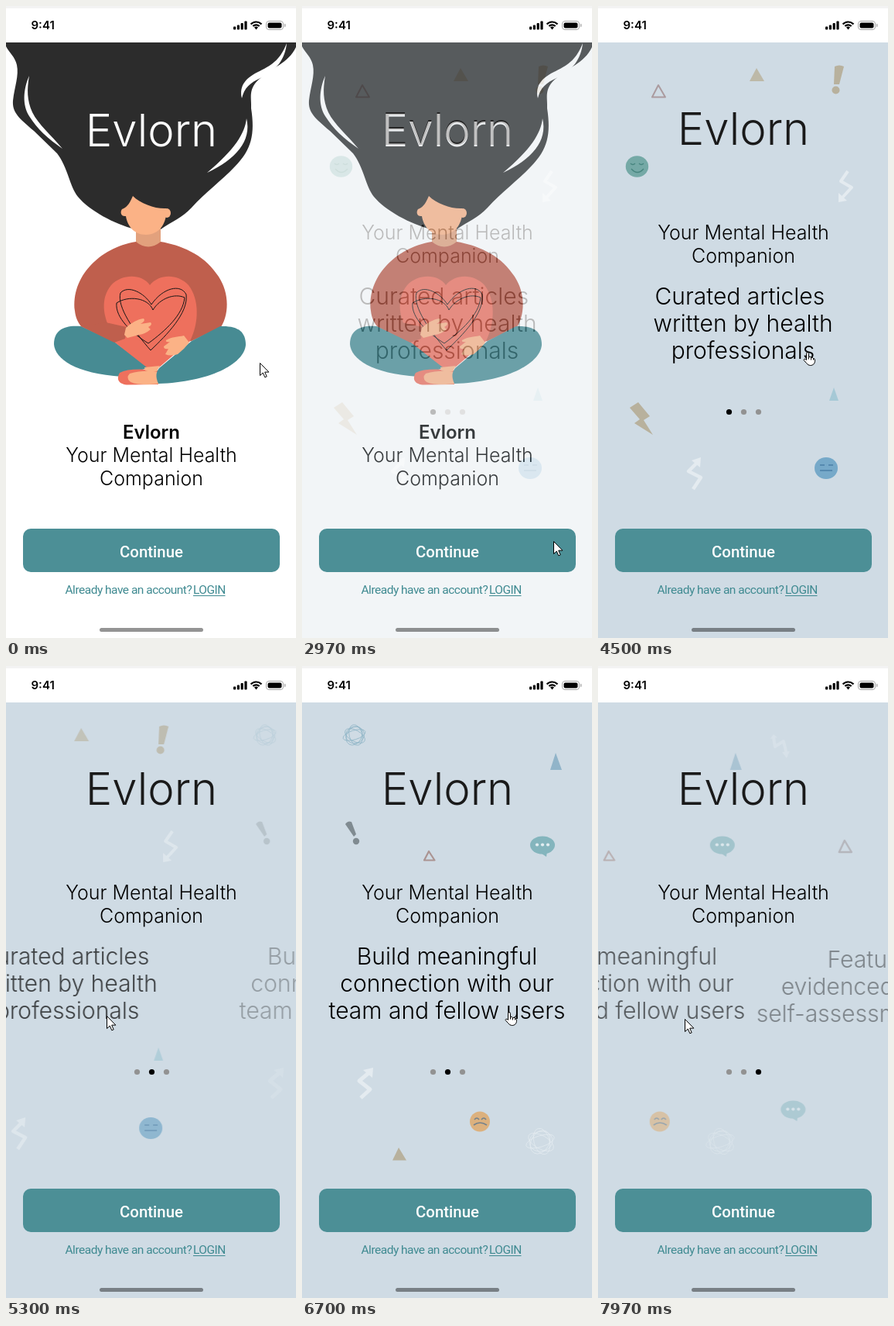
An HTML page with a canvas for the animation above (8 s loop, 375 by 815 pixels).

```html
<!DOCTYPE html>
<html lang="en">
<head>
<meta charset="utf-8">
<title>Onboarding</title>
<style>
html, body { margin: 0; width: 100%; height: 100%; overflow: hidden; background: #fff; }
canvas { display: block; width: 375px; height: 815px; }
</style>
</head>
<body>
<canvas id="stage"></canvas>
<script>
const W = 375, H = 815, LOOP = 8000;
const BRAND = 'Evlorn';
const BG = '#cfdbe4', SKIN = '#fbb286', TEAL = '#478b93', CORAL = '#ee705d', RUST = '#bf5f4d', HAIR = '#2c2c2c';
const OLIVE = '#b8b19d', PALE = '#e4ebf0';
const scale = window.devicePixelRatio || 1;

let g;

function makeLayer(width, paint, canvas = document.createElement('canvas')) {
  canvas.width = width * scale;
  canvas.height = H * scale;
  g = canvas.getContext('2d');
  g.scale(scale, scale);
  g.lineJoin = 'round';
  if (paint) paint();
  return canvas;
}

// ---- drawing helpers ----
function fill(color, path) {
  g.fillStyle = color;
  g.fill(new Path2D(path));
}

function line(color, width, path) {
  g.strokeStyle = color;
  g.lineWidth = width;
  g.stroke(new Path2D(path));
}

function oval(color, x, y, rx, ry = rx) {
  g.fillStyle = color;
  g.beginPath();
  g.ellipse(x, y, rx, ry, 0, 0, 7);
  g.fill();
}

function box(color, x, y, w, h, r) {
  g.fillStyle = color;
  g.beginPath();
  g.roundRect(x, y, w, h, r);
  g.fill();
}

function text(str, x, y, font, color, align = 'center', spacing = 0) {
  g.font = font;
  g.fillStyle = color;
  g.textAlign = align;
  g.letterSpacing = spacing + 'px';
  g.fillText(str, x, y);
}

function thinText(str, x, y, size, color = '#000') {
  text(str, x, y, `300 ${size}px Inter, sans-serif`, color);
}

function lines(rows, x, y, size, step) {
  rows.forEach((row, i) => thinText(row, x, y + i * step, size));
}

function scribble(color, x, y, rx, ry) {
  g.strokeStyle = color;
  g.lineWidth = 0.8;
  for (let i = 0; i < 5; i++) {
    g.beginPath();
    g.ellipse(x + (i % 3) - 1, y + (i % 2), rx * (1 - i * 0.05), ry * (0.6 + i * 0.12), i * 0.8 - 0.3, 0, 7);
    g.stroke();
  }
}

function bubble(color, x, y) {
  oval(color, x, y, 16, 11.5);
  fill(color, `M${x - 4} ${y + 9}L${x + 5} ${y + 15}L${x + 6} ${y + 8}Z`);
  for (const dx of [-7, 0, 7]) oval('#e2edf1', x + dx, y - 0.5, 2.1);
}

// ---- screens ----
function drawFigure() {
  fill(HAIR, 'M0 47H375V53C365 74 343 80 329 93C312 107 318 118 317 132C322 165 318 185 296 207C278 226 258 240 240 260C228 273 214 278 200 288H167C140 281 108 264 93 246C82 232 80 208 66 190L36 161C16 144 8 137 9 122C11 104 17 90 14 76C12 66 4 60 0 52Z');
  fill('#fff', 'M30 90C22 108 21 128 30 142C40 158 54 171 73 184C58 166 42 153 34 137C27 121 27 108 30 90Z');
  fill('#fff', 'M363 48C355 68 346 75 328 84C311 92 301 102 305 119C308 106 315 99 331 92C350 83 361 68 363 48Z');
  fill('#fff', 'M311 145C309 164 296 185 260 215C297 198 318 174 311 145Z');

  fill('#e2a17d', 'M168 282H200V314H168Z');
  fill(RUST, 'M168 304C120 312 84 350 89 393C90 402 93 408 97 413L140 434L186 440L240 432L278 414C290 395 288 365 272 345C255 320 225 308 200 304Q184 317 168 304Z');
  oval(SKIN, 208, 267, 5, 6);
  fill(SKIN, 'M164 245C174 255 194 262 207 261C209 280 198 295 181 295C166 295 157 284 155 271C149 272 147 266 150 262C155 260 159 257 164 245Z');

  fill(TEAL, 'M97 413C75 411 62 418 62 436C63 455 90 474 150 478L185 466L140 433Z');
  fill(CORAL, 'M186 360C176 345 150 345 136 360C121 378 127 402 134 415L141 434L182 466H198L238 432C250 408 250 378 236 360C222 345 198 345 186 360Z');
  fill(RUST, 'M97 413L129 408L156 414L154 429L140 434Z');

  line('#161616', 1, 'M188 385C179 370 158 359 148 370C143 388 166 420 187 444C208 424 236 396 233 372C226 358 203 363 188 385Z');
  line('#161616', 1, 'M190 392C184 376 158 373 143 383C141 402 163 422 184 435C206 419 229 398 231 376C218 370 199 377 190 392Z');

  fill(SKIN, 'M155 415C163 408 170 404 178 403Q181 406 174 410L187 408Q190 411 184 414L187 417Q180 423 172 424L157 428L153 424Z');
  fill(CORAL, 'M147 473C143 480 144 487 156 488.5L197 488L196 470Q160 466 147 473Z');
  fill(SKIN, 'M160 474C176 469 190 471 196 472L198 487C180 489 165 488 160 484Q155 479 160 474ZM179 466L199 464L195 471Q186 472 180 470Z');
  fill(TEAL, 'M277 413C300 412 310 420 310 437C308 462 262 485 197 487C193 478 194 472 198 467L240 432Z');
  fill(SKIN, 'M237 434L230 425C222 427 215 426 207 431Q206 434 212 433L204 439Q204 443 210 442L206 449Q212 452 222 449L230 442Z');
}

function drawWelcome() {
  g.fillStyle = '#fff';
  g.fillRect(0, 0, W, H);
  drawFigure();
  thinText(BRAND, 188, 181, 58, '#fff');
  text(BRAND, 188, 558, '600 24px Inter, sans-serif', '#000');
  lines(['Your Mental Health', 'Companion'], 188, 588, 25, 30);
}

function drawArticles() {
  line('#ab9b9f', 2, 'M78 102L70 117.5H87Z');
  fill('#bdb9a8', 'M205 80L196 97H215Z');
  fill(OLIVE, 'M306 78Q312 75 318 78L312 101H305Z');
  oval(OLIVE, 307.5, 108.5, 5);
  oval('#75a9a6', 50.5, 207, 14.7, 13.7);
  line('#47857f', 1.3, 'M42 203Q45 206 48 203M53 203Q56 206 59 203M43 210Q51 219 59 210');
  line(PALE, 4, 'M323 213L314 226L328 234L316 247');
  fill(PALE, 'M311 241L322 251L311 253Z');
  fill('#a6c9d6', 'M305 492L299 509H311Z');
  fill(OLIVE, 'M41 518L52 511L67 529L59 534L71 553L47 538L54 533Z');
  line(PALE, 4.5, 'M123 623L133 608L117 600L129 588');
  fill(PALE, 'M121 586L133 582L132 595Z');
  oval('#76a9c9', 295, 596, 15, 14);
  line('#4b7fa6', 1.3, 'M287 592H293M298 592H304M287 599H303');
  lines(['Curated articles ', 'written by health', 'professionals'], 187.5, 385, 30, 35);
}

function drawConnection() {
  scribble('#8db4c6', 68.5, 89, 15, 10);
  fill('#91b4c9', 'M328 112L321 134H336Z');
  fill('#808b91', 'M56 204Q59 199 64 201L70 217L67 220Z');
  oval('#808b91', 70, 226, 4.2);
  line('#ab9492', 2.2, 'M164 239L158 250.5H171.5Z');
  bubble('#84b5bd', 311, 231);
  line(PALE, 5, 'M76 557L88 546L74 535L86 525');
  fill(PALE, 'M79 521L92 518L91 531Z');
  oval('#dcb17e', 230, 587.5, 13);
  line('#74828c', 1.6, 'M223 585Q226 581 229 585M232 585Q235 581 238 585M222 592Q230 586 239 592');
  scribble(PALE, 309, 613, 19, 12);
  fill(OLIVE, 'M125 621L117 637.5H135Z');
  lines(['Build meaningful', 'connection with our', 'team and fellow users'], 187.5, 385, 30, 35);
}

// Laid out as it sits once the drag has covered PEEK pixels
const PEEK = 150;
function drawAssessment() {
  line(PALE, 4, 'M227 91L229 104L240 97L244 113');
  fill(PALE, 'M238 111L248 110L244 119ZM223 94L227 88L232 92Z');
  line('#8f7f80', 2.4, 'M319 225L312 240H328Z');
  bubble('#7bb1ba', 252.5, 572);
  lines(['Features', 'evidenced based', 'self-assessment tools'], 357, 389, 30, 35);
}

const welcome = makeLayer(W, drawWelcome);
const articles = makeLayer(W, drawArticles);
const connection = makeLayer(W, drawConnection);
const assessment = makeLayer(W + 200, drawAssessment);

// ---- timing ----
// Smooth curve through [time, value...] keys, flat beside resting spans
function track(keys, t, k) {
  const last = keys.length - 1;
  if (t <= keys[0][0]) return keys[0][k];
  if (t >= keys[last][0]) return keys[last][k];
  let i = 0;
  while (keys[i + 1][0] < t) i++;
  const slope = n => {
    if (n === 0 || n === last) return 0;
    const a = keys[n - 1], b = keys[n], c = keys[n + 1];
    if ((b[k] - a[k]) * (c[k] - b[k]) <= 0) return 0;
    return (c[k] - a[k]) / (c[0] - a[0]);
  };
  const a = keys[i], b = keys[i + 1], d = b[0] - a[0], u = (t - a[0]) / d;
  const e = u * u * (3 - 2 * u);
  return a[k] + (b[k] - a[k]) * e + d * u * (1 - u) * ((1 - u) * slope(i) - u * slope(i + 1));
}

const pointer = [
  [440, 328, 460], [880, 319, 540], [1320, 331, 633], [1630, 329, 670],
  [2180, 329, 670], [2430, 316, 680], [2700, 325, 690],
  [3510, 325, 690], [4370, 267, 446], [4440, 267, 446], [4500, 265, 446],
  [4780, 265, 446], [5400, 120, 452], [5770, 120, 455], [5920, 120, 455],
  [6100, 236, 454], [6700, 262, 446], [7310, 262, 446]
];
const firstDrag = [[4780, 0], [5400, 145], [5770, 386], [5920, 386], [6000, 375]];
const secondDrag = [[7310, 0], [7500, 36.5], [7970, 150], [8100, 180]];

function drawPointer(t, drag) {
  const x = drag ? 262 - drag : track(pointer, t, 1);
  const y = drag ? 446 + Math.min(7, drag / 5) + drag / 75 : track(pointer, t, 2);
  const hand = (t > 4250 && t < 4800) || (t > 5900 && t < 6890);
  g.save();
  g.translate(Math.round(x) + 0.5, Math.round(y) + 0.5);
  const shape = hand
    ? 'M4 10V2Q4 0 5.5 0Q7 0 7 2V6Q9 5 10 7Q12 6 13 8Q15 8 15 10V12Q14 17 9 17Q6 17 4 14L.5 10Q1 8 3 9ZM7 6V9M10 7V10M13 8V10'
    : 'M0 0V16L3.8 12.6L6.3 18.3L8.7 17.3L6.2 11.6H11.4Z';
  fill('#fff', shape);
  line('#000', 1, shape);
  g.restore();
}

function drawStatus() {
  g.fillStyle = '#fff';
  g.fillRect(0, 0, W, 47);
  g.fillStyle = '#f3f3f3';
  g.fillRect(0, 0, W, 3);
  text('9:41', 32.5, 30, '600 15px Inter, sans-serif', '#000', 'left');
  [4, 6, 8.5, 11].forEach((h, i) => box('#000', 294 + i * 4.8, 30.5 - h, 3.2, h, 1));
  g.strokeStyle = '#000';
  g.lineWidth = 2.2;
  for (const r of [9.5, 5.7]) {
    g.beginPath();
    g.arc(323.5, 30, r, -Math.PI * 0.76, -Math.PI * 0.24);
    g.stroke();
  }
  fill('#000', 'M321 27.5Q323.5 25.5 326 27.5L323.5 30.5Z');
  g.strokeStyle = '#a6a6a6';
  g.lineWidth = 1;
  g.beginPath();
  g.roundRect(336.5, 19.5, 22, 11, 3.5);
  g.stroke();
  box('#000', 338.5, 21.5, 18, 7, 2);
  box('#a6a6a6', 360, 23, 1.4, 4, 0.7);
}

function drawFooter() {
  box('#4c8f96', 22, 674, 332, 56, 10);
  text('Continue', 188, 711, '500 20.4px Roboto, sans-serif', '#fff');
  const font = '400 15.5px Roboto, sans-serif';
  text('Already have an account?', 76.5, 758, font, '#3f8a91', 'left', -0.5);
  text('LOGIN', 242, 758, font, '#3f8a91', 'left', -0.5);
  g.fillRect(242, 760, 41.5, 1);
  box('rgba(0,0,0,.42)', 121, 802, 134, 5, 2.5);
}

function drawLayer(layer, x, alpha) {
  if (alpha <= 0) return;
  g.globalAlpha = Math.min(1, alpha);
  g.drawImage(layer, x, 0, layer.width / scale, H);
  g.globalAlpha = 1;
}

function render(t) {
  const d1 = track(firstDrag, t, 1), d2 = track(secondDrag, t, 1);
  const fade = Math.min(1, Math.max(0, (t - 2930) / 400));
  const shown = 1 - Math.pow(1 - fade, 2.9);

  g.fillStyle = BG;
  g.fillRect(0, 0, W, H);
  if (shown > 0) {
    drawLayer(articles, -d1, 1 - d1 / W);
    drawLayer(connection, W - d1 - d2, d1 / W - d2 / W);
    drawLayer(assessment, PEEK - d2, d2 / W);
    thinText(BRAND, 188, 179, 58, '#1a1a1a');
    lines(['Your Mental Health', 'Companion'], 188, 301, 25, 30);
    const active = t < 4810 ? 0 : t < 7350 ? 1 : 2;
    for (let i = 0; i < 3; i++) oval(i === active ? '#000' : '#929292', 169.5 + i * 19, 523.5, 3.6);
  }
  drawLayer(welcome, 0, 1 - shown);
  drawFooter();
  drawStatus();
  drawPointer(t, d2);
}

makeLayer(W, null, document.getElementById('stage'));
const start = performance.now();
function frame() {
  render((performance.now() - start) % LOOP);
  requestAnimationFrame(frame);
}
frame();
</script>
</body>
</html>
```
